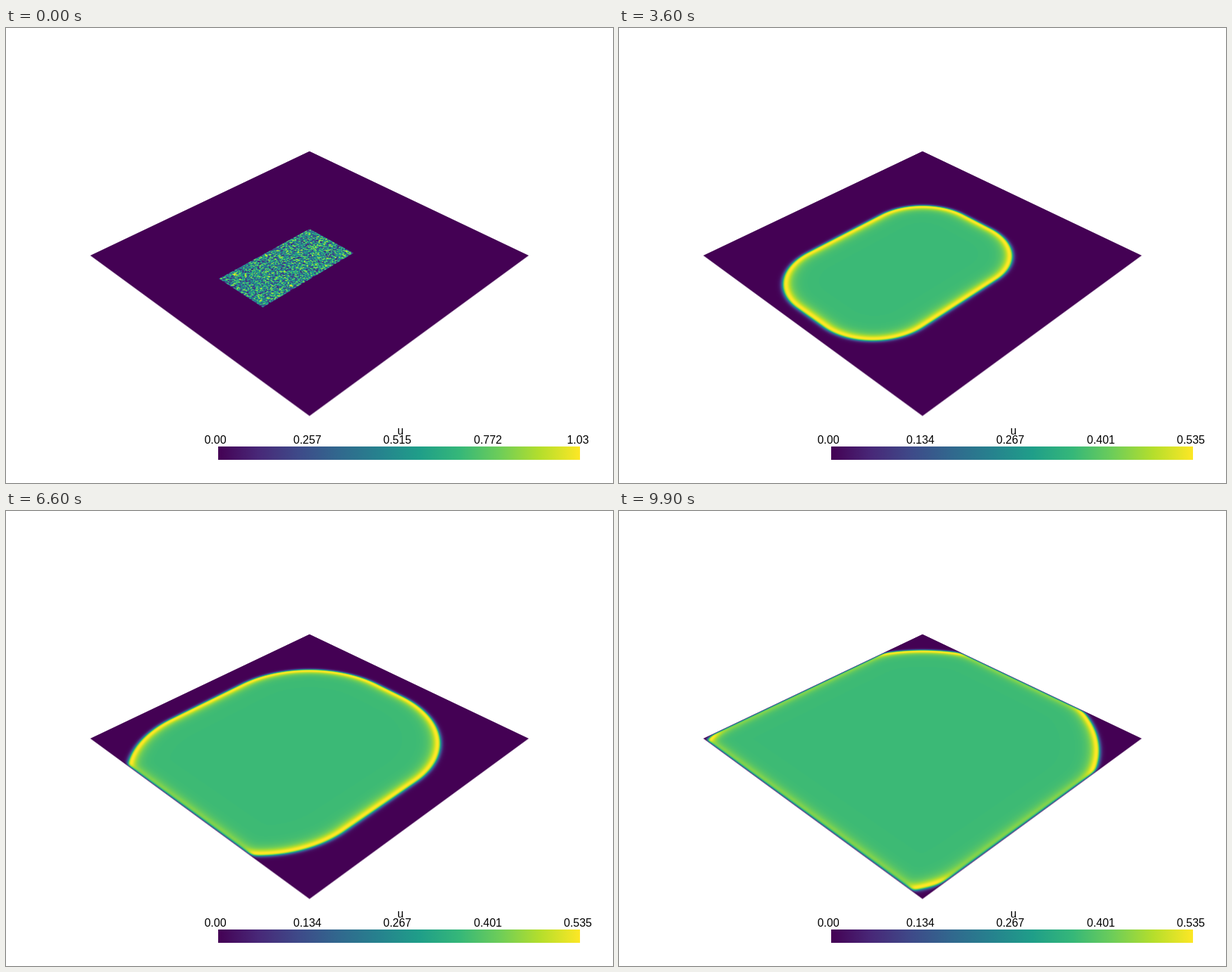
Write an HTML page with a canvas that moves like this. It is 864 by 648 pixels and loops after 10 s.

```html
<!DOCTYPE html>
<html lang="en">
<head>
<meta charset="utf-8">
<title>Spreading front</title>
<style>
html, body { margin: 0; width: 864px; height: 648px; overflow: hidden; background: #fff; }
canvas { display: block; }
</style>
</head>
<body>
<canvas id="stage" width="864" height="648"></canvas>
<script>
const ctx = document.getElementById('stage').getContext('2d');
const { exp, min, max, abs, hypot, tanh, floor, round } = Math;

// Viridis colour map
const stops = ['440154', '482878', '3e4a89', '31688e', '26828e', '1f9e89', '35b779', '6dcd59', 'b4de2c', 'fde725']
  .map(hex => [0, 2, 4].map(i => parseInt(hex.substr(i, 2), 16)));
const palette = Array.from({ length: 256 }, (_, i) => {
  const p = i / 255 * 9, k = min(floor(p), 8);
  return stops[k].map((c, j) => round(c + (stops[k + 1][j] - c) * (p - k)));
});

// Seeded noise on the grid inside the starting rectangle
const N = 256, A0 = 100, A1 = 200, B0 = 100, B1 = 150;
let seed = 7;
const random = () => (seed = (seed * 16807) % 2147483647) / 2147483647;
const noise = new Float32Array(N * N);
for (let i = A0; i <= A1; i++)
  for (let j = B0; j <= B1; j++) noise[i * N + j] = random();

function blur(src, r) {
  const out = new Float32Array(N * N);
  for (let i = r; i < N - r; i++)
    for (let j = r; j < N - r; j++) {
      let sum = 0;
      for (let di = -r; di <= r; di++)
        for (let dj = -r; dj <= r; dj++) sum += src[(i + di) * N + j + dj];
      out[i * N + j] = sum / (2 * r + 1) ** 2;
    }
  return out;
}
const soft = blur(noise, 2), softer = blur(soft, 2);

function sample(grid, a, b) {
  const x = max(a, 0) * (N - 1), y = max(b, 0) * (N - 1);
  const i = min(floor(x), N - 2), j = min(floor(y), N - 2);
  const fx = x - i, fy = y - j, k = i * N + j;
  return (grid[k] * (1 - fy) + grid[k + 1] * fy) * (1 - fx)
    + (grid[k + N] * (1 - fy) + grid[k + N + 1] * fy) * fx;
}

// Signed distance to the starting rectangle with corners rounded by m
function distance(a, b, m) {
  const qa = abs(a - 0.5895) - 0.1985 + m, qb = abs(b - 0.49) - 0.099 + m;
  return hypot(max(qa, 0), max(qb, 0)) + min(max(qa, qb), 0) - m;
}

// Perspective view of the unit square: a runs down-left, b runs down-right
const C = 0.17505, E = 91.783, K = 257.38, TOP = 175.5, LEFT = 119, W = 627, H = 380;
const image = ctx.createImageData(W, H);
const cells = [];
for (let y = 0; y < H; y++)
  for (let x = 0; x < W; x++) {
    const py = y + 174.5, s = (py - TOP) / (E + C * py);
    const d = (x + LEFT + 0.5 - 432) * (1 - C * s) / K;
    const a = (s - d) / 2, b = (s + d) / 2, edge = min(a, b, 1 - a, 1 - b);
    const cover = min(1, edge * 260 + 0.5);
    if (cover > 0) cells.push({ at: (y * W + x) * 4, a, b, edge: max(edge, 0), alpha: 255 * cover });
  }

const peakAt = t => 0.5348 + 0.004 * exp(-t / 1.1) + 0.4904 * exp(-t / 0.229);

function level(cell, radius, rounding) {
  const depth = radius - distance(cell.a, cell.b, rounding);
  if (depth < -0.04) return 0;
  const crest = 0.82 * exp(-max(depth, 0) / 0.014);
  const rim = 0.42 * exp(-cell.edge / 0.014);
  return (0.68 + hypot(crest, rim)) / (1 + exp(-depth / 0.004)) * tanh(cell.edge / 0.007);
}

function drawPlane(t) {
  // Curved parts of the front lag a little behind the straight ones
  const radius = 0.006 + 0.044 * t, rounding = 0.042 - 0.018 * exp(-t / 3);
  const scale = 0.535 / peakAt(t);
  const mix = t < 0.9 ? exp(-t / 0.15) : 0;
  const grid = t === 0 ? noise : t < 0.15 ? soft : softer;
  for (const cell of cells) {
    let v = mix < 1 ? level(cell, radius, rounding) * scale : 0;
    if (mix) v += (sample(grid, cell.a, cell.b) - v) * mix;
    image.data.set(palette[round(255 * min(1, max(0, v)))], cell.at);
    image.data[cell.at + 3] = cell.alpha;
  }
  ctx.putImageData(image, LEFT, 174);
}

const bar = ctx.createLinearGradient(302, 0, 817, 0);
stops.forEach((c, i) => bar.addColorStop(i / 9, `rgb(${c})`));

function drawScale(t) {
  ctx.fillStyle = bar;
  ctx.fillRect(302, 596, 515, 19);
  ctx.fillStyle = '#000';
  ctx.font = '16px "Liberation Sans", Arial, sans-serif';
  ctx.textAlign = 'center';
  ctx.fillText('u', 561.5, 578.5);
  const peak = peakAt(t);
  [298, 429, 557, 686, 814].forEach((x, i) =>
    ctx.fillText(i ? (peak * i / 4).toPrecision(3) : '0.00', x, 591.5));
}

let shown = -1;
function frame() {
  const step = floor(performance.now() % 10000 / 100);
  if (step !== shown) {
    shown = step;
    ctx.fillStyle = '#fff';
    ctx.fillRect(0, 0, 864, 648);
    drawPlane(step / 10);
    drawScale(step / 10);
  }
  requestAnimationFrame(frame);
}
frame();
</script>
</body>
</html>
```
